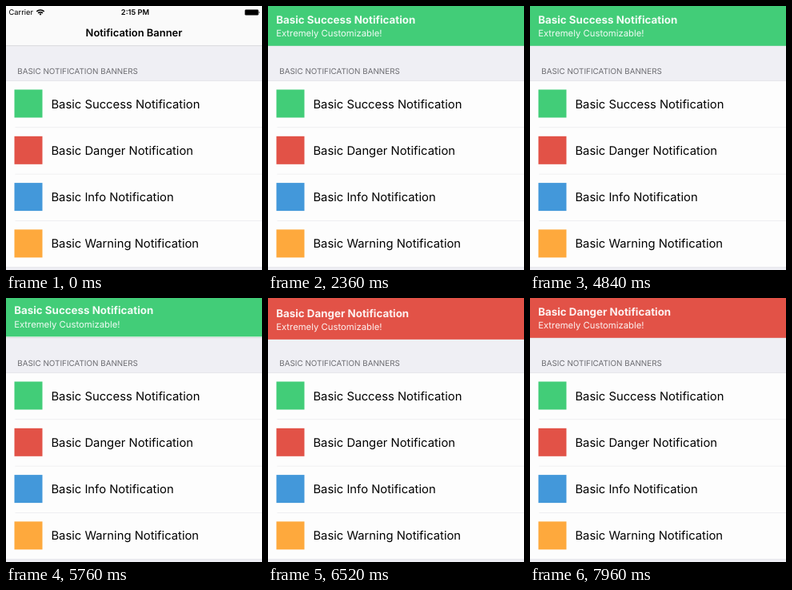
These frames come from a looping animation (320x330 px, 8 s). An HTML page:

```html
<!DOCTYPE html>
<html lang="en">
<head>
<meta charset="utf-8">
<title>Notification Banner</title>
<style>
  html, body { margin: 0; width: 100%; height: 100%; overflow: hidden; background: #efeff4; }
  svg {
    display: block; width: 320px; height: 330px;
    font-family: Inter, Roboto, sans-serif; text-rendering: geometricPrecision;
  }
  .row { font-size: 14.8px; }
  .header { font-size: 9.85px; fill: #6d6d72; }
  .nav { font-size: 12.95px; font-weight: 600; text-anchor: middle; }
  .status { font-size: 9.3px; }
  .clock { font-weight: 600; text-anchor: middle; }
  .banner { fill: #fff; }
  .title { font-size: 13.35px; font-weight: 700; fill-opacity: .92; }
  .subtitle { font-size: 11.3px; fill-opacity: .92; }
</style>
</head>
<body>
<svg viewBox="0 0 320 330">
  <rect width="320" height="330" fill="#efeff4"/>
  <rect width="320" height="49.5" fill="#fafafa"/>
  <rect y="49.5" width="320" height=".6" fill="#c9c9cd"/>
  <text class="nav" x="160" y="37.5">Notification Banner</text>
  <text class="header" x="14.3" y="85.2">BASIC NOTIFICATION BANNERS</text>

  <g id="status" class="status">
    <text x="3.5" y="11.3">Carrier</text>
    <g fill="none" stroke="#000" stroke-width="1.5">
      <path d="M38.3 6.9a6.6 6.6 0 0 1 9.4 0"/>
      <path d="M40.1 8.9a4.1 4.1 0 0 1 5.8 0"/>
    </g>
    <path d="M43 11.7l-1.5-1.6a2.1 2.1 0 0 1 3 0z"/>
    <text class="clock" x="161.5" y="11.3">2:15 PM</text>
    <rect x="298.6" y="4.4" width="17" height="7.2" rx="1.4"/>
    <path d="M316.3 6.6q1.6 1.4 0 2.8z"/>
  </g>

  <g id="rows"></g>
  <g id="banners"></g>
</svg>
<script>
const LOOP = 8000, HEIGHT = 49.8, PITCH = 58.3, TABLE_TOP = 93.5;
const ENTER = 500, LEAVE = 500;

const kinds = [
  { name: 'Success', color: '#42cd78', show: 1480, hide: 5700 },
  { name: 'Danger', color: '#e25247', show: 6270, hide: Infinity },
  { name: 'Info', color: '#4398da' },
  { name: 'Warning', color: '#fea93d' }
];
const label = kind => `Basic ${kind.name} Notification`;
const byId = id => document.getElementById(id);

byId('rows').innerHTML =
  `<rect y="${TABLE_TOP}" width="320" height="${PITCH * 4}" fill="#fdfdfd"/>` +
  `<path d="M0 ${TABLE_TOP}H320M0 ${TABLE_TOP + PITCH * 4}H320" stroke="#e0e0e4" stroke-width=".7"/>` +
  kinds.map((kind, i) => {
    const y = TABLE_TOP + i * PITCH;
    const line = i ? `<rect x="11.5" y="${y - .3}" width="308.5" height=".6" fill="#e6e6e9"/>` : '';
    return line +
      `<rect x="10.5" y="${y + 11}" width="35" height="35" fill="${kind.color}"/>` +
      `<text class="row" x="56.4" y="${y + 34}">${label(kind)}</text>`;
  }).join('');

const shown = kinds.filter(kind => kind.show);
byId('banners').innerHTML = shown.map(kind =>
  `<g class="banner">
    <rect y="-20" width="320" height="${HEIGHT + 20}" fill="${kind.color}"/>
    <text class="title" x="10.2" y="21.8">${label(kind)}</text>
    <text class="subtitle" x="10.2" y="38">Extremely Customizable!</text>
  </g>`).join('');
const banners = [...byId('banners').children];

// Underdamped spring, damping ratio 0.7
function spring(ms) {
  const decay = 13.8, freq = 14.1, s = ms / 1000;
  return 1 - Math.exp(-decay * s) * (Math.cos(freq * s) + decay / freq * Math.sin(freq * s));
}

// cubic-bezier(.42, 0, .58, 1)
function easeInOut(x) {
  let lo = 0, hi = 1;
  for (let i = 0; i < 20; i++) {
    const u = (lo + hi) / 2;
    const at = 3 * u * (1 - u) * (.42 * (1 - u) + .58 * u) + u ** 3;
    if (at < x) lo = u; else hi = u;
  }
  return lo * lo * (3 - 2 * lo);
}

function reveal(kind, t) {
  if (t > kind.hide) return 1 - easeInOut(Math.min(1, (t - kind.hide) / LEAVE));
  return t - kind.show < ENTER ? spring(t - kind.show) : 1;
}

function draw(t) {
  let covered = false;
  shown.forEach((kind, i) => {
    const active = t >= kind.show && t < kind.hide + LEAVE;
    covered = covered || active;
    banners[i].style.display = active ? '' : 'none';
    if (active) banners[i].setAttribute('transform', `translate(0 ${(reveal(kind, t) - 1) * HEIGHT})`);
  });
  byId('status').style.display = covered ? 'none' : '';
}

const start = performance.now();
function tick() {
  draw((performance.now() - start) % LOOP);
  requestAnimationFrame(tick);
}
tick();
</script>
</body>
</html>
```
